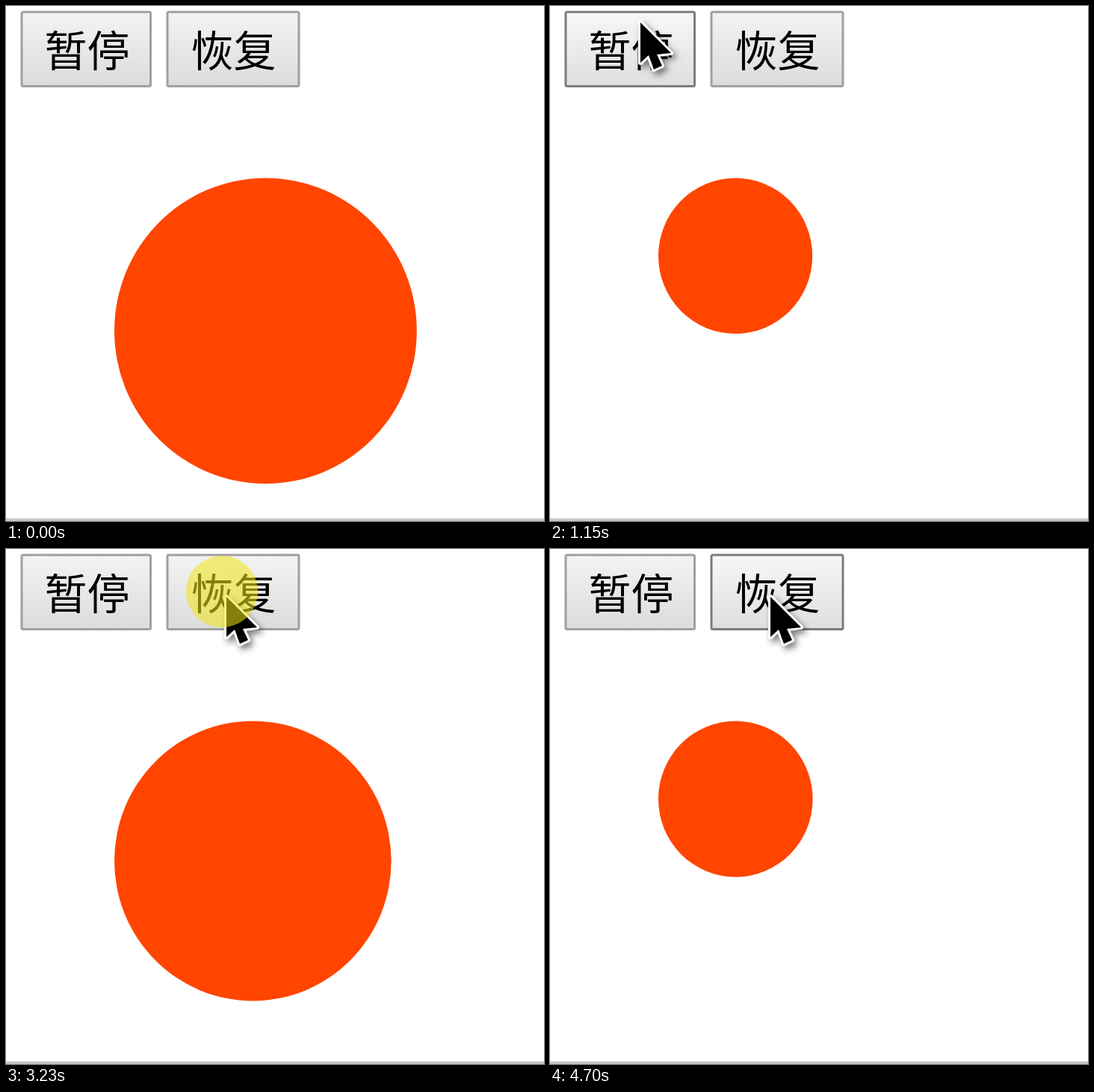
An HTML page that plays this animation: 720 by 690 pixels, repeating every 4.85 s.

```html
<!DOCTYPE html>
<html lang="zh-CN">
<head>
<meta charset="utf-8">
<style>
  html, body { margin: 0; height: 100%; overflow: hidden; background: #fff; }
  svg { display: block; width: 720px; height: 690px; }
  text { font: 57px "Noto Sans CJK SC", "Noto Sans CJK", sans-serif; }
  .button { fill: url(#face); stroke: #a0a0a0; stroke-width: 3; }
  .button.hover { fill: url(#lit); stroke: #7c7c7c; }
  #cursor { stroke: #fff; stroke-width: 6; stroke-linejoin: round; paint-order: stroke; filter: drop-shadow(4px 5px 4px rgba(0, 0, 0, .5)); }
</style>
</head>
<body>
<svg viewBox="0 0 720 690">
  <defs>
    <linearGradient id="face" x2="0" y2="1">
      <stop stop-color="#f3f3f3"/><stop offset="1" stop-color="#dcdcdc"/>
    </linearGradient>
    <linearGradient id="lit" x2="0" y2="1">
      <stop stop-color="#f7f7f7"/><stop offset="1" stop-color="#dfdfdf"/>
    </linearGradient>
  </defs>
  <rect y="686.5" width="720" height="4" fill="#c6c6c6"/>
  <rect class="button" id="pause" x="21" y="8" width="172.5" height="99.5" rx="2"/>
  <rect class="button" id="resume" x="216" y="8" width="176" height="99.5" rx="2"/>
  <text x="51.5" y="81">暂停</text>
  <text x="247.5" y="81">恢复</text>
  <ellipse id="ball" fill="#ff4500"/>
  <path id="cursor" d="M3 6V60L14 50L21 69L32 64L25 49L44 47Z"/>
  <circle id="press" r="48" fill="rgba(240, 230, 25, .55)"/>
</svg>
<script>
const LOOP = 4850, STEP = 77, LAST_TICK = 61, RATE = 13;
const PEAK = 2.92, PAUSED = 22.42, RESUMED = 42.69;
const PRESSES = [22, 42];

// Cursor stops: tick, x, y
const STOPS = [
  [14, 118, 16], [18, 118, 16], [21, 123, 58],
  [29, 123, 59], [30, 124, 62], [36, 292, 58]
];

const get = id => document.getElementById(id);
const [ball, cursor, press, pause, resume] =
  ['ball', 'cursor', 'press', 'pause', 'resume'].map(get);

const clamp = (v, lo, hi) => Math.min(Math.max(v, lo), hi);
const bezier = (s, a, b) => 3 * (1 - s) ** 2 * s * a + 3 * (1 - s) * s * s * b + s ** 3;

// CSS "ease": cubic-bezier(.25, .1, .25, 1)
function ease(x) {
  let lo = 0, hi = 1;
  for (let i = 0; i < 24; i++) {
    const mid = (lo + hi) / 2;
    if (bezier(mid, .25, .25) < x) lo = mid; else hi = mid;
  }
  return bezier(lo, .1, 1);
}

// Alternates 1 s shrinking and 1 s growing, stopped while paused
function growth(tick) {
  const held = clamp(tick - PAUSED, 0, RESUMED - PAUSED);
  const phase = ((tick - held - PEAK) / RATE + 2) % 2;
  return phase < 1 ? 1 - ease(phase) : ease(phase - 1);
}

function cursorAt(tick) {
  const next = STOPS.findIndex(stop => stop[0] > tick);
  if (next < 0) return STOPS.at(-1).slice(1);
  const [t0, x0, y0] = STOPS[next - 1], [t1, x1, y1] = STOPS[next];
  const p = (tick - t0) / (t1 - t0), s = p * p * (3 - 2 * p);
  return [x0 + (x1 - x0) * s, y0 + (y1 - y0) * s];
}

function set(el, attrs) {
  for (const name in attrs) el.setAttribute(name, attrs[name]);
}

function draw(now) {
  const tick = Math.min(Math.floor((now % LOOP + 15) / STEP), LAST_TICK);
  const size = 1 + growth(tick), rx = 102.8 * size, ry = 104 * size;
  set(ball, { rx, ry, cx: 145 + rx, cy: 230.5 + ry });

  const shown = tick >= STOPS[0][0];
  const [x, y] = shown ? cursorAt(tick) : [-100, -100];
  set(cursor, { transform: `translate(${x} ${y})`, visibility: shown ? 'visible' : 'hidden' });
  set(press, { cx: x - 3, cy: y - 1, visibility: PRESSES.includes(tick) ? 'visible' : 'hidden' });
  pause.classList.toggle('hover', x > 20 && x < 195);
  resume.classList.toggle('hover', x > 215 && !PRESSES.includes(tick));
  requestAnimationFrame(draw);
}
draw(0);
</script>
</body>
</html>
```
